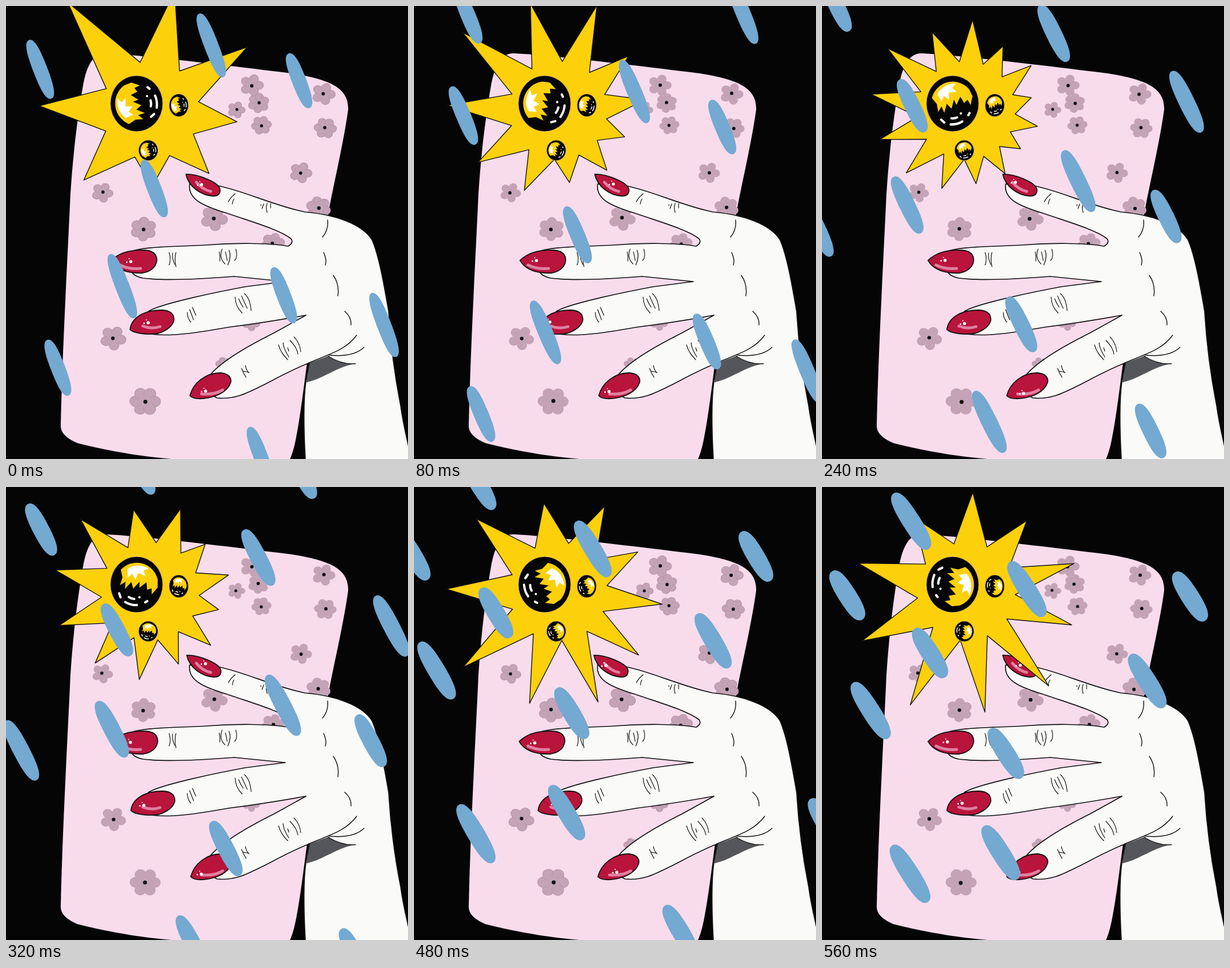
An HTML page for the animation above (640 ms loop, 705x794 px).

```html
<!DOCTYPE html>
<html lang="en">
<head>
<meta charset="utf-8">
<title>Hand, sun and rain</title>
<style>
  html, body { margin: 0; width: 100%; height: 100%; overflow: hidden; background: #050505; }
  svg { display: block; width: 100vw; height: 100vh; }
  .ink { fill: none; stroke: #111; stroke-width: 1.4; stroke-linecap: round; }
  .fine { stroke-width: 1.2; }
  .petals { fill: #c4a3b6; }
  .outlined .petals { stroke: #b795aa; stroke-width: 1; }
  #nails { fill: #b9143c; stroke: #111; stroke-width: 1.8; stroke-linejoin: round; }
  .gloss { fill: none; stroke: #e080a0; stroke-width: 5; stroke-linecap: round; }
  #sun { fill: #fdd00c; stroke: #111; stroke-width: 1.4; stroke-linejoin: round; }
  #drops { fill: #74a9d2; }
</style>
</head>
<body>
<svg viewBox="0 0 705 794" preserveAspectRatio="none">
  <defs>
    <g id="shine">
      <path fill="#fdd00c" d="M-33-18A38 38 0 0 1 34-17L37-4 30 10 27 0 20 4 16-8 6 4 4-6-4 8-10-2-18 12-20 0-28 8-27-6Z"/>
      <path fill="#fff" d="M-22-22Q-8-37 14-32L6-26 12-18-2-20-4-8-12-16-18-8Z"/>
      <path fill="none" stroke="#fff" stroke-width="4" stroke-linecap="round"
        d="M-12 34Q0 37 9 34M-26 22l4 6M-8 24q5 2 10 1M10 20h.1M22 26l3-3"/>
    </g>
  </defs>

  <path fill="#f9dcec" d="M176 83C240 86 420 108 500 118C560 128 602 140 600 182C592 240 575 310 565 364L528 625C518 700 510 770 498 794H290C220 788 160 775 125 766Q95 753 96 735C99 600 108 440 113 330C118 250 128 180 135 140C142 100 155 82 176 83Z"/>
  <g id="flowers"></g>

  <path fill="#fafaf8" stroke="#111" stroke-width="1.7" stroke-linejoin="round" d="M524 361C575 365 625 382 642 410C655 440 664 495 671 535C675 600 682 650 692 700C696 730 701 750 706 772V796H525C523 760 520 700 526 658L533 625C500 638 470 655 450 665C420 680 400 690 370 687L340 670 357 648C375 625 420 598 470 573L526 542C470 552 430 558 390 563C340 572 290 580 255 575L235 560 250 535C270 523 350 505 420 492L490 483Q440 478 400 474C350 478 280 482 240 477Q222 473 220 464L215 432C235 421 300 422 350 419C400 415 460 415 495 421Q505 415 500 408C480 392 430 378 390 364C350 352 318 340 322 312L372 315C420 325 470 350 524 361Z"/>
  <path fill="#55565a" d="M533 625L566 613Q580 627 613 627C580 632 560 652 526 660Z"/>
  <path class="ink" d="M530 626C560 612 595 605 615 577M567 612C600 615 618 608 628 598M565 614Q590 629 613 627"/>
  <path class="ink" d="M564 375Q566 392 555 405M557 432Q563 445 560 454M574 472Q585 488 582 508M594 535Q606 545 605 559"/>
  <path class="ink fine" d="M402 329Q394 335 390 343M400 338q-3 4-3 9M447 348v2M452 347l-3 8M458 346q-3 8 0 16M464 346v8M286 432q4 12 0 22M292 433q-1 10 4 20M298 432q-3 10 0 25M374 431q2 8 1 16M379 426q-6 15 5 26M385 431l3 15M391 428q5 10-2 26M403 426q4 14-2 20"/>
  <path class="ink fine" d="M318 537q0 10 6 17M322 532l7 18M327 528q3 8 6 14M402 510q0 16 12 28M408 513q3 8 8 15M413 508l10 22M418 504q10 8 12 30M413 635q3 8 8 16M416 640l10 2M420 630q1 8 6 13M478 594q4 14 16 26M486 590q0 10 10 25M494 599l2 6M498 586q12 12 14 24M505 580q10 10 12 26"/>

  <g id="nails">
    <path d="M317 295C335 294 375 308 377 322Q377 334 364 333C345 332 322 318 317 295Z"/>
    <path d="M186 446C200 432 220 427 245 428Q266 429 266 446Q264 464 240 468C215 469 195 462 186 446Z"/>
    <path d="M219 567C222 545 245 533 275 533Q297 534 296 551Q292 566 268 574C245 577 225 573 219 567Z"/>
    <path d="M324 683C330 660 352 643 378 643Q396 645 396 658Q392 674 370 683C350 690 330 690 324 683Z"/>
  </g>
  <path class="gloss" d="M334 309Q345 322 359 325M200 454Q215 462 236 460M240 561Q255 567 270 562M343 680Q365 682 380 673"/>
  <g id="glints" fill="#fff"></g>

  <path id="sun"/>
  <g id="orbs"></g>
  <g id="drops"></g>
</svg>
<script>
const STEP = 80, POSES = 8;
const RAD = Math.PI / 180;
const el = id => document.getElementById(id);
const sin = deg => Math.sin(deg * RAD);
const cos = deg => Math.cos(deg * RAD);
const polar = (x, y, r, deg) => `${x + r * cos(deg)} ${y + r * sin(deg)}`;

// x, y, radius
const flowers = [
  [431, 139, 20], [443, 170, 18], [404, 182, 15], [448, 209, 17], [557, 154, 20], [560, 214, 19],
  [517, 292, 19], [548, 354, 21], [169, 327, 18], [241, 391, 22], [365, 372, 23], [468, 417, 20],
  [188, 582, 22], [244, 693, 26], [430, 555, 15], [382, 629, 14]];

// centre at the start of the loop; an optional third value is the last pose in which the drop shows
const drops = [
  [60, 111], [360, 69, 4], [514, 131], [260, 320], [204, 491], [487, 507], [91, 634], [663, 559],
  [446, 788], [69, -63], [550, -70], [317, -190], [-64, -239], [-99, 148], [106, -351], [392, -338],
  [-168, -138], [-97, -470], [-209, -340]];

const glints = [[343, 311], [213, 447], [243, 556], [349, 677]];
const spikes = [8, 11, 12, 14, 12, 10, 10, 10];
const firstSpike = [230, 218, 218, 217, 224, 229, 220, 196];

function flower([x, y, r], i) {
  const count = 5 + i % 2;
  let petals = "";
  for (let k = 0; k < count; k++) {
    const turn = k * 360 / count + i * 37;
    petals += `<ellipse cx="${r * .62}" rx="${r * .42}" ry="${r * .4}" transform="rotate(${turn})"/>`;
  }
  return `<g transform="translate(${x} ${y})"><g class="petals" transform="scale(1 .92)">${petals}
    <circle r="${r * .45}" stroke="none"/></g><circle class="eye" r="${1.4 + r * .08}" fill="#111"/></g>`;
}

const orb = (x, y, rx, ry) => `<g transform="translate(${x} ${y})">
  <ellipse rx="${rx}" ry="${ry}" fill="#050505" stroke="#efbd7c" stroke-width=".8"/>
  <g transform="scale(${rx / 46} ${ry / 48})"><use class="turning" href="#shine"/></g></g>`;

// Spikes crowd towards the lower left; the longest side swings round as the sun pulses.
function sunPath(p) {
  const count = spikes[p];
  const reach = 168 + 24 * cos(45 * (p + 1));
  const swing = 12 + 7 * Math.abs(p - 3.5);
  const angle = k => {
    const even = firstSpike[p] + k * 360 / count;
    return even + 10 * sin(even - 215);
  };
  const points = [];
  for (let k = 0; k < count; k++) {
    const tip = angle(k);
    const length = reach + swing * cos(tip - 255 + 25 * p) + 10 * Math.cos(3 * k);
    points.push(polar(247, 175, length, tip), polar(253, 183, 86, (tip + angle(k + 1)) / 2));
  }
  return `M${points.join("L")}Z`;
}

// All drops share one fall, blown further to the right as they speed along.
function drop([x, y, last = POSES], i, p) {
  if (p > last) return "";
  const cx = x + 25 * p + 1.6 * p * p;
  const cy = y + 82 * p - .9 * p * p;
  return `<path d="M-1 0C-1-.8-.6-1 0-1S1-.8 1 0 .6 1 0 1-1 .8-1 0Z"
    transform="translate(${cx} ${cy}) rotate(${69 - 1.6 * p}) scale(${55 + 5 * Math.sin(i * 2)} ${12.5 + p / 2})"/>`;
}

function glint([x, y], i, p) {
  const cx = x + 7 * Math.sin(p * 1.9 + i), cy = y + 2 * Math.cos(p + i);
  return `<circle cx="${cx}" cy="${cy}" r="2.7"/><circle cx="${cx - 7}" cy="${cy + 1}" r="1.4"/>
    <circle cx="${cx - 3}" cy="${cy - 5}" r="1"/>`;
}

el("flowers").innerHTML = flowers.map(flower).join("");
el("orbs").innerHTML = orb(229, 171, 46, 49) + orb(303, 174, 17, 20) + orb(249.5, 253, 17, 18);
const eyes = document.querySelectorAll(".eye");
const shines = document.querySelectorAll(".turning");

function show(p) {
  const redrawn = p % 6 === 0;
  el("sun").setAttribute("d", sunPath(p));
  el("drops").innerHTML = drops.map((d, i) => drop(d, i, p)).join("");
  el("glints").innerHTML = glints.map((g, i) => glint(g, i, p)).join("");
  el("nails").setAttribute("transform", `translate(${redrawn ? -1.5 : 0} 0)`);
  el("flowers").setAttribute("class", redrawn ? "outlined" : "");
  shines.forEach(s => s.setAttribute("transform", `rotate(${28 * p - 98})`));
  eyes.forEach((eye, i) => {
    eye.setAttribute("cx", Math.sin(p * 2.3 + i));
    eye.setAttribute("cy", Math.cos(p * 1.7 + i * 2));
  });
}

let shown = -1;
const start = performance.now();
function tick(now) {
  const pose = Math.floor(Math.max(0, now - start) / STEP) % POSES;
  if (pose !== shown) show(shown = pose);
  requestAnimationFrame(tick);
}
tick(start);
</script>
</body>
</html>
```
